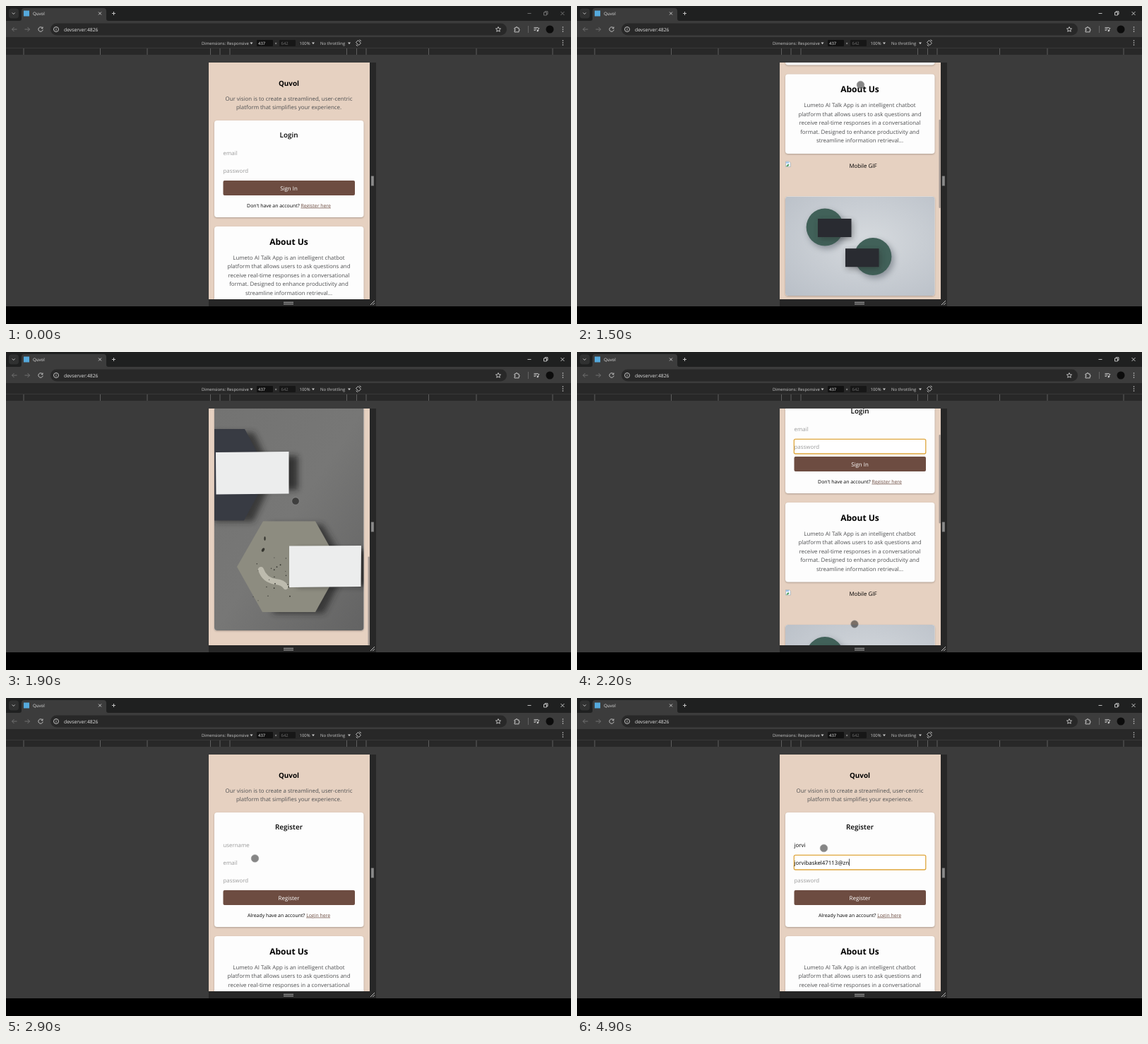
An HTML page that plays this animation: 800 px wide and 450 px high, repeating every 5000 ms.

```html
<!DOCTYPE html>
<html lang="en">
<head>
<meta charset="utf-8">
<title>Login page demo</title>
<style>
html, body { margin: 0; width: 100%; height: 100%; overflow: hidden; background: #000; }
#stage { display: block; }
text { font: 7.9px "Open Sans", "Noto Sans", sans-serif; text-rendering: geometricPrecision; white-space: pre; }
.mid { text-anchor: middle; }
.h1 { font-size: 9.9px; font-weight: 700; }
.h2 { font-size: 9.9px; font-weight: 600; }
.h3 { font-size: 12px; font-weight: 700; }
.small { font-size: 6.9px; }
.ui { font-size: 5.92px; fill: #c9c9c9; }
.soft { fill: #4f5052; }
.hint { fill: #9b9b9b; }
.card { fill: #fdfdfd; filter: drop-shadow(0 1px 1px rgba(0, 0, 0, .25)); }
.line { fill: none; stroke: #d0d0d0; stroke-width: .9; }
.dim { stroke: #777; }
</style>
</head>
<body>
<svg id="stage" width="800" height="450" viewBox="0 0 800 450">
  <defs>
    <radialGradient id="wall" cx=".55" cy=".45" r=".75">
      <stop offset="0" stop-color="#d6dade"/><stop offset="1" stop-color="#bac0c8"/>
    </radialGradient>
    <linearGradient id="stone" x2="1" y2="1">
      <stop offset="0" stop-color="#737372"/><stop offset=".5" stop-color="#777776"/><stop offset="1" stop-color="#636363"/>
    </linearGradient>
    <filter id="blur" x="-30%" y="-30%" width="160%" height="160%"><feGaussianBlur stdDeviation="4"/></filter>
    <clipPath id="photo1"><rect x="295" y="485" width="211.5" height="140.5" rx="4"/></clipPath>
    <clipPath id="photo2"><rect x="295" y="638" width="211.5" height="316" rx="4"/></clipPath>
  </defs>

  <!-- browser window -->
  <rect width="800" height="425" fill="#3b3b3b"/>
  <rect width="800" height="21" fill="#1f2020"/>
  <rect x="4" y="3.5" width="14" height="14" rx="4" fill="#303131"/>
  <path class="line" d="M8.7 9.5l2 2 2-2"/>
  <path d="M19 21q3 0 3-3V7q0-4 4-4h112q4 0 4 4v11q0 3 3 3z" fill="#3c3c3c"/>
  <rect x="25" y="6.5" width="8" height="8" fill="#55a9dc"/>
  <text x="38" y="13" style="font-size:6.1px" fill="#e4e4e4">Quvol</text>
  <path class="line" d="M131 8.5l4 4m0-4l-4 4M150 10.5h5m-2.5-2.5v5"/>
  <path id="controls" class="line" d="M738.500 10.500h5M761.500 9h4v4h-4zM763 9V7.700h4v4h-1.500M785.500 8l5 5m0-5l-5 5"/>

  <rect y="21" width="800" height="23.500" fill="#3c3c3c"/>
  <rect x="63" y="24.500" width="646" height="17" rx="8.500" fill="#282828"/>
  <path class="line dim" d="M15.500 33H8.500m3-3l-3 3 3 3M26.500 33h7m-3-3l3 3-3 3"/>
  <path class="line" d="M51.700 31.200A3.200 3.200 0 1 0 52.200 33.500M52 29.500v2.200h-2.200"/>
  <circle class="line" cx="71" cy="33" r="3.500"/>
  <path class="line" d="M71 32.500v2.200M71 30.800v.8"/>
  <text x="82" y="35.500" style="font-size:6.800px" fill="#e0e0e0">devserver:4826</text>
  <path class="line" d="M697 29.500l1.050 2.300 2.500.25-1.900 1.650.6 2.500-2.250-1.300-2.250 1.300.6-2.500-1.900-1.650 2.500-.25z"/>
  <path class="line" d="M720 31h2v-1.200h2V31h2.200v2h.8v1.500h-.8v2.300H720v-2.200h1v-1.400h-1z"/>
  <path class="line" d="M739.500 28v10" stroke-opacity=".3"/>
  <path class="line" d="M747.500 30.500h6M747.500 32.500h4M747.500 34.500h2.500M753.800 35v-3.500h1.500"/>
  <circle cx="752.700" cy="35" r="1.200" fill="#d0d0d0"/>
  <circle cx="770" cy="33" r="5.500" fill="#0c0c0c"/>

  <!-- device toolbar and ruler -->
  <rect y="44" width="800" height="25" fill="#282828"/>
  <path d="M0 59.500h800" stroke="#3d3d3d" stroke-width=".8"/>
  <g id="ticks" stroke="#666" stroke-width=".9"></g>
  <rect x="355" y="48" width="23" height="9" rx="1" fill="#111"/>
  <rect x="387" y="48" width="23" height="9" rx="1" fill="#171717"/>
  <g id="tools"></g>
  <path class="line" d="M495.500 51.500l3-3 4 4-3 3zM496 54.500q.2 2 2.200 2M502.500 50q-.2-2-2.200-2"/>

  <!-- device frame -->
  <rect x="287" y="80" width="237" height="345" fill="#272727"/>
  <rect x="516.800" y="240.500" width="4.200" height="14" rx=".5" fill="#777"/>
  <path d="M518.900 241v13" stroke="#aaa" stroke-width=".8"/>
  <path d="M393 419.300h14M393 421.800h14" stroke="#b5b5b5"/>
  <path class="line" d="M516 423l6-6M519.200 423l2.800-2.800"/>

  <svg id="page" x="287" y="80" width="228" height="335" viewBox="287 80 228 335">
    <rect x="287" y="0" width="228" height="1100" fill="#e6d1c1"/>
    <g id="intro"></g>
    <g id="form"></g>
    <g id="rest">
      <rect class="card" x="295" y="312" width="211.500" height="112.500" rx="4"/>
      <g id="about"></g>
      <path d="M295.500 435.500h5l2 2v5.500h-7z" fill="#eef3f8" stroke="#9aa6ad" stroke-width=".6"/>
      <path d="M296 442.500l3-3.500 1.500 1.500-2 2z" fill="#4b9d5b"/>
      <path d="M296 436h4v2h-4z" fill="#9cc3ea"/>

      <rect class="card" x="295" y="485" width="211.500" height="140.500" rx="4"/>
      <g clip-path="url(#photo1)">
        <rect x="295" y="485" width="212" height="141" fill="url(#wall)"/>
        <g id="discs"></g>
      </g>

      <rect class="card" x="295" y="638" width="211.500" height="316" rx="4"/>
      <g clip-path="url(#photo2)"><g transform="translate(0 560)">
        <rect x="295" y="78" width="212" height="316" fill="url(#stone)"/>
        <path d="M295 114h56l29 62-30 64h-55zM375 244h73l36 60-34 66h-72z" fill="#252525" opacity=".75" filter="url(#blur)"/>
        <path d="M295 109h43l34 64-35 65.500h-42z" fill="#383b43"/>
        <path d="M364 239.500h74l36 64-36 64.500h-75l-36-64z" fill="#8d8c80"/>
        <path d="M361 308q5 15 21 17 10 1 14 7" fill="none" stroke="#bdbbae" stroke-width="8" stroke-linecap="round"/>
        <g id="pores" fill="#35352f"></g>
        <path d="M310 147h103v48h-103zM412 280h100v51h-100z" fill="#1c1c1c" opacity=".75" filter="url(#blur)"/>
        <path d="M297 142l103.500-1v59.500l-103 1zM401 274.500l102-.5-.5 58-101.500 1z" fill="#eceded"/>
      </g></g>
    </g>
  </svg>
  <rect id="thumb" x="512.600" width="2" height="125.400" rx="1" fill="#8c8582"/>
  <circle id="touch" r="5.300" fill="#000" fill-opacity=".47" stroke="#999" stroke-opacity=".55"/>
</svg>

<script>
const $ = id => document.getElementById(id);
const label = (x, y, s, cls = "", extra = "") => `<text x="${x}" y="${y}" class="${cls}" ${extra}>${s}</text>`;
const lines = (y, cls, list) => list.map((s, i) => label(400.5, y + i * 12.5, s, "mid " + cls)).join("");

$("ticks").innerHTML = [25, 133.5, 200, 289.5, 303, 317, 482.5, 496.5, 510, 598.5, 666, 774]
  .map(x => `<path d="M${x} 60v9"/>`).join("");
$("tools").innerHTML =
  [[277, "Dimensions: Responsive"], [357, "437", "#eee"], [380.5, "×"], [389.5, "642", "#707070"], [415.5, "100%"], [445, "No throttling"]]
    .map(([x, s, c = "#c9c9c9"]) => label(x, 54.6, s, "ui", `style="fill:${c}"`)).join("") +
  [347.5, 435, 486].map(x => `<path d="M${x - 2} 51.500h4l-2 2.700z" fill="#c9c9c9"/>`).join("") +
  [33, 52].map(y => [-3, 0, 3].map(d => `<circle cx="788.500" cy="${y + d}" r=".8" fill="#d0d0d0"/>`).join("")).join("");
$("intro").innerHTML = label(400.5, 112.7, "Quvol", "mid h1") + lines(133.8, "soft", [
  "Our vision is to create a streamlined, user-centric",
  "platform that simplifies your experience."]);
$("about").innerHTML = label(400.5, 337.6, "About Us", "mid h3") + lines(358.7, "soft", [
  "Lumeto AI Talk App is an intelligent chatbot",
  "platform that allows users to ask questions and",
  "receive real-time responses in a conversational",
  "format. Designed to enhance productivity and",
  "streamline information retrieval..."]) + label(405, 444.3, "Mobile GIF", "mid");
$("discs").innerHTML = [[351, 528.5, 341], [419, 570, 380]].map(([x, y, left], i) => {
  const top = i ? 558.7 : 516.5;
  return `<circle cx="${x + 3}" cy="${y + 4}" r="27" fill="#59616a" opacity=".55" filter="url(#blur)"/>
    <circle cx="${x}" cy="${y}" r="26.400" fill="#416159"/>
    <rect x="${left + 2}" y="${top + 3}" width="47.500" height="26" fill="#222" opacity=".4" filter="url(#blur)"/>
    <rect x="${left}" y="${top}" width="47.500" height="26" fill="#292b31"/>`;
}).join("");

let seed = 7;
const random = () => (seed = seed * 16807 % 2147483647) / 2147483647;
$("pores").innerHTML = Array.from({ length: 32 }, () =>
  `<circle cx="${350 + random() * 90}" cy="${280 + random() * 72}" r="${.4 + random() * .6}"/>`).join("") +
  `<ellipse cx="366.500" cy="264" rx="1.200" ry="3"/><ellipse cx="364" cy="280" rx="1.800" ry="3" transform="rotate(30 364 280)"/>`;

// Rows of [time, value, ...], joined by straight segments.
const scrollKeys = [[900, 0], [1000, 18], [1400, 182], [1500, 215.5], [1800, 500], [1900, 560],
  [2000, 470], [2200, 99], [2300, 0]];
const touchKeys = [[800, 425, 370], [1000, 412, 309], [1500, 401.5, 111.5], [1600, 405, 330], [1900, 410, 211],
  [2000, 402, 250], [2200, 393, 385], [2300, 400, 390], [2600, 439, 282], [2900, 352.5, 227], [3200, 349.5, 212.5]];

function at(keys, t) {
  const i = keys.findIndex(k => k[0] > t);
  if (i < 1) return keys.at(i).slice(1);
  const a = keys[i - 1], b = keys[i], p = (t - a[0]) / (b[0] - a[0]);
  return a.slice(1).map((v, j) => v + (b[j + 1] - v) * p);
}

function form(joining, focus, values) {
  const fields = joining ? ["username", "email", "password"] : ["email", "password"];
  const [title, action, ask, link] = joining
    ? ["Register", "Register", "Already have an account?", "Login here"]
    : ["Login", "Sign In", "Don't have an account?", "Register here"];
  const end = 197 + fields.length * 25;
  return `<rect class="card" x="295" y="162" width="211.500" height="${end - 110}" rx="4"/>` +
    label(400.5, 185.7, title, "mid h2") +
    fields.map((name, i) => {
      const y = 197 + i * 25, value = values[name];
      const ring = name === focus
        ? `<rect x="307.300" y="${y + .3}" width="186.500" height="20.700" rx="2" fill="#fff" stroke="#dfa63d" stroke-width="1.300"/>` : "";
      return ring + label(307.5, y + 13.7, value || name, value ? "" : "hint", name === focus ? 'id="active"' : "");
    }).join("") +
    `<rect x="307.500" y="${end}" width="186.500" height="21" rx="2" fill="#6d4c41"/>` +
    label(400.5, end + 13.7, action, "mid", 'fill="#fff"') +
    label(400.5, end + 37.6, `${ask} <tspan fill="#6d4c41" text-decoration="underline">${link}</tspan>`, "mid small");
}

function render(t) {
  const joining = t >= 2700;
  const focus = t >= 3900 ? "email" : t >= 3200 ? "username" : t >= 2100 && !joining ? "password" : "";
  const values = {
    username: "jorvi".slice(0, Math.max(0, (t - 3200) / 100)),
    email: "jorvibaskel47113@zn".slice(0, Math.max(0, (t - 4000) / 50 + 1)),
  };
  $("form").innerHTML = form(joining, focus, values);
  if (joining && focus) {
    const x = 308 + (values[focus] ? $("active").getComputedTextLength() : 0);
    const y = focus === "email" ? 227.5 : 202.5;
    $("form").insertAdjacentHTML("beforeend", `<path d="M${x} ${y}v10" stroke="#111" stroke-width=".7"/>`);
  }
  $("rest").setAttribute("transform", `translate(0 ${joining ? 25 : 0})`);

  const [scroll] = at(scrollKeys, t), [x, y] = at(touchKeys, t);
  $("page").setAttribute("viewBox", `287 ${80 + scroll} 228 335`);
  $("thumb").setAttribute("y", 80 + scroll * 335 / 895);
  $("thumb").setAttribute("opacity", t >= 1000 && t < 2600 ? .85 : 0);
  $("touch").setAttribute("cx", x);
  $("touch").setAttribute("cy", y);
  $("touch").setAttribute("opacity", t < 800 ? 0 : 1);
  $("controls").classList.toggle("dim", t < 800);
}

let shown = -1;
const start = performance.now();
function tick(now) {
  const t = Math.floor(Math.max(0, now - start) % 5000 / 100) * 100;
  if (t !== shown) render(shown = t);
  requestAnimationFrame(tick);
}
tick(start);
</script>
</body>
</html>
```
